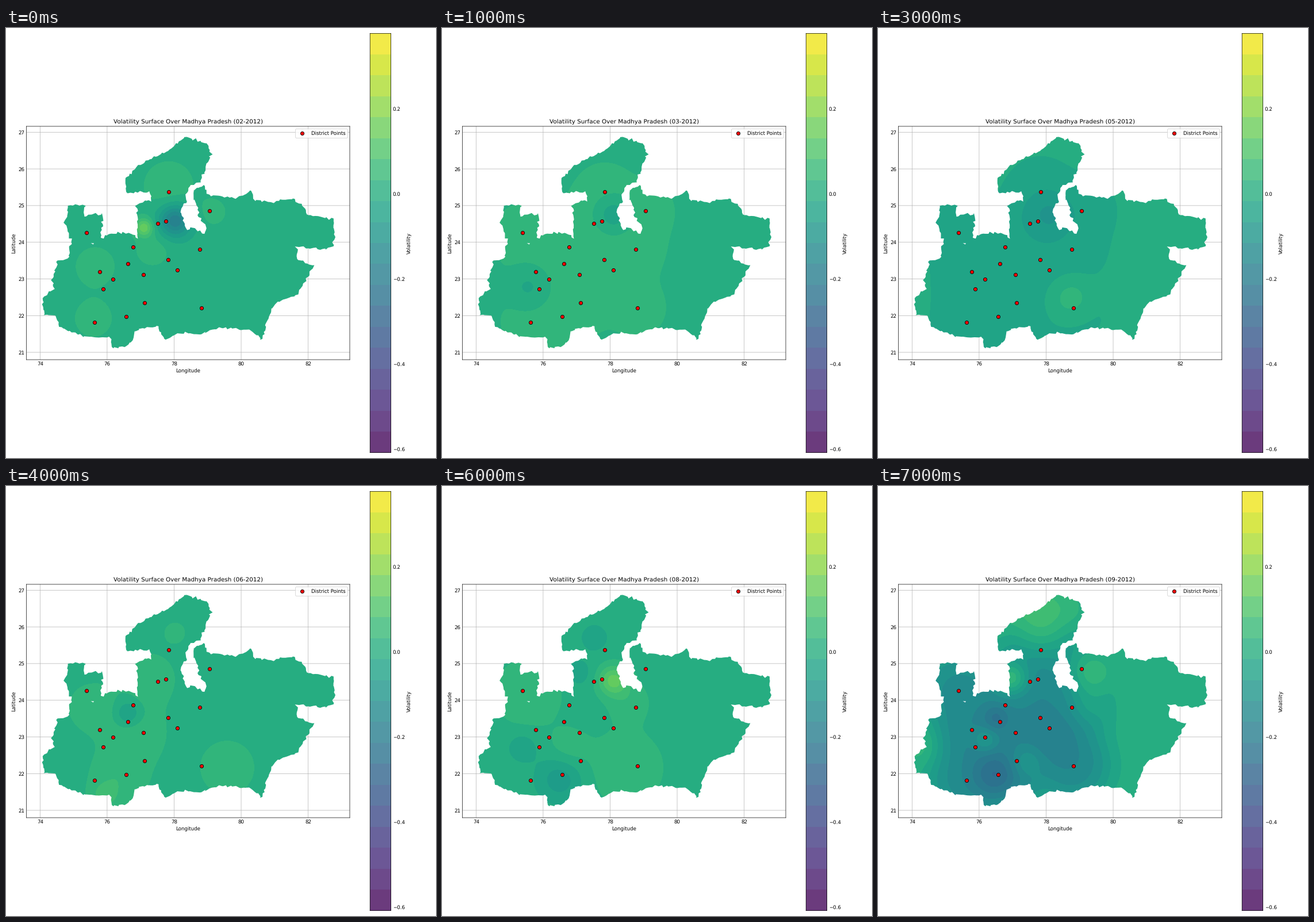
A matplotlib script for the animation above (8 s loop, 748 by 748 pixels).

```python
import numpy as np
import matplotlib.pyplot as plt
from matplotlib.animation import FuncAnimation
from matplotlib.path import Path

SIZE = 748
LEFT, RIGHT, TOP, BOTTOM = 35.55, 598, 171, 577
BAR = (633.2, 669.65, 9.35, 738.65)
CALM, STEP = 0.62, 0.035          # colormap position of zero, and of one band

# Corners of the state border in screen pixels, clockwise from the northern tip
BORDER = [
    (311, 190), (348, 200), (357, 219), (338, 268), (318, 275), (313, 290),
    (314, 302), (304, 317), (309, 338), (315, 352), (324, 347), (346, 357),
    (349, 345), (335, 329), (333, 312), (324, 282), (346, 273), (350, 290),
    (372, 293), (400, 297), (426, 283), (432, 299), (462, 303), (500, 297),
    (519, 312), (524, 325), (570, 332), (571, 376), (556, 385), (506, 381),
    (506, 401), (535, 414), (508, 463), (468, 478), (452, 516), (446, 542),
    (428, 527), (372, 521), (334, 534), (310, 529), (275, 541), (264, 518),
    (228, 525), (212, 553), (186, 557), (182, 539), (135, 537), (92, 520),
    (86, 500), (66, 501), (64, 468), (82, 455), (82, 434), (91, 405),
    (110, 400), (114, 372), (103, 338), (109, 309), (138, 307), (134, 326),
    (168, 324), (165, 370), (148, 376), (185, 357), (214, 357), (229, 366),
    (227, 308), (254, 298), (250, 286), (210, 287), (206, 264), (232, 237),
    (284, 212),
]
STATIONS = [
    (283, 285), (354, 318), (263.5, 340.5), (277.5, 336), (140, 356),
    (221, 381), (337, 385), (281.5, 403), (211.5, 410), (297.5, 420.5),
    (162.5, 424), (238.5, 429), (185.5, 436.5), (169, 454), (240.5, 478.5),
    (339.5, 487), (209, 501.5), (153.5, 511.5),
]

viridis = plt.get_cmap("viridis")
rng = np.random.default_rng(4)


def to_lon(x):
    return 74 + (np.asarray(x) - 59.3) / 58.29


def to_lat(y):
    return 27 - (np.asarray(y) - 181.3) / 63.8


def add_axes(x0, x1, y0, y1):
    return fig.add_axes([x0 / SIZE, 1 - y1 / SIZE, (x1 - x0) / SIZE, (y1 - y0) / SIZE])


def border_path():
    """Border through the corners, roughened by seeded jitter."""
    ring = np.array(BORDER + BORDER[:1], float)
    along = np.r_[0, np.cumsum(np.hypot(*np.diff(ring, axis=0).T))]
    spots = np.arange(0, along[-1], 4)
    x, y = (np.interp(spots, along, ring[:, k]) + rng.normal(0, 1.2, spots.size)
            for k in (0, 1))
    return Path(np.c_[to_lon(x), to_lat(y)])


def bump(x, y, r):
    return np.exp(-((X - x) ** 2 + (Y - y) ** 2) / (2 * r * r))


def surface(level, *blobs):
    """A level held near the stations, plus round blobs (x, y, height, radius)."""
    field = level * near + sum(h * bump(x, y, r) for x, y, h, r in blobs)
    bands = np.arange(-9, 13)
    filled = ax.contourf(to_lon(X), to_lat(Y), field,
                         levels=np.r_[bands - 0.5, bands[-1] + 0.5],
                         colors=viridis(np.clip(CALM + STEP * bands, 0, 1)),
                         zorder=2)
    filled.set_clip_path(border, ax.transData)
    return filled


def draw_colorbar(bands=20):
    bar = add_axes(*BAR)
    edges = np.linspace(-0.609, 0.3765, bands + 1)
    for k in range(bands):
        shade = np.array(viridis((k + 0.5) / bands)[:3])
        bar.axhspan(edges[k], edges[k + 1], color=0.8 * shade + 0.2,
                    lw=0, antialiased=False)
    bar.set(xlim=(0, 1), ylim=(edges[0], edges[-1]), xticks=[],
            yticks=[-0.6, -0.4, -0.2, 0, 0.2])
    bar.yaxis.tick_right()
    bar.yaxis.set_label_position("right")
    bar.set_ylabel("Volatility")
    return bar


plt.rcParams.update({"font.family": "DejaVu Sans", "text.hinting": "no_hinting",
                     "xtick.major.size": 0, "ytick.major.size": 0})
fig = plt.figure(figsize=(12, 12), dpi=SIZE / 12, facecolor="white")
ax = add_axes(LEFT, RIGHT, TOP, BOTTOM)
ax.set(xlim=to_lon([LEFT, RIGHT]), ylim=to_lat([BOTTOM, TOP]),
       xticks=range(74, 83, 2), yticks=range(21, 28),
       xlabel="Longitude", ylabel="Latitude")
ax.grid(True)
bar = draw_colorbar()
for line in [*ax.get_xgridlines(), *ax.get_ygridlines(),
             *ax.spines.values(), *bar.spines.values()]:
    line.set_snap(False)

X, Y = np.meshgrid(np.arange(50, 590, 2.0), np.arange(180, 570, 2.0))
crowd = sum(bump(x, y, 32) for x, y in STATIONS)
near = crowd / (crowd + 0.3)
border = border_path()

february = surface(
    0, (283, 275, 1.1, 34), (294, 335, -5.5, 20), (240, 347, 4, 11),
    (255, 385, 1, 23), (155, 415, 1.2, 25), (152, 505, 1.1, 25), (360, 320, 0.9, 19))
march = surface(1, (298, 325, -2, 20), (150, 450, -1.5, 25))
april = surface(
    5, (299, 328, 6, 24), (237, 325, -5, 24), (110, 455, -3.5, 34),
    (205, 500, 2.5, 28), (270, 460, 1.2, 38), (283, 525, -2.5, 22), (265, 255, -3, 28))
may = surface(-1.5, (335, 470, 2, 30), (298, 325, -1.5, 24))
june = surface(
    0, (250, 335, 1.1, 34), (225, 430, 1.3, 38), (195, 510, 1.3, 36),
    (150, 385, 1.2, 30), (170, 540, 1.4, 16), (212, 396, -2.4, 17),
    (385, 490, 1.2, 35), (294, 255, 1, 14))
july = surface(
    8, (302, 322, 2.8, 26), (303, 458, 4.3, 32), (130, 460, 2.8, 24),
    (193, 455, -2.2, 22), (265, 372, -1.5, 22), (262, 245, -4, 32))
august = surface(
    0, (265, 264, -1.1, 18), (237, 325, -1.2, 17), (298, 338, 3.8, 18),
    (325, 375, 1.1, 26), (150, 360, 1.4, 41), (220, 455, 1, 25),
    (320, 490, 1.4, 45), (205, 510, -2.2, 27), (140, 455, -1.5, 17))
september = surface(
    -5, (283, 245, 4.6, 38), (372, 322, 4.8, 30), (232, 335, 5, 20),
    (85, 450, 1.5, 25), (203, 503, -3.2, 28), (205, 403, -2.2, 16),
    (187, 442, 2.2, 14), (315, 450, -1.2, 40), (258, 480, 2, 18), (365, 385, 2, 25))
months = [february, march, april, may, june, july, august, september]

points = np.array(STATIONS)
ax.scatter(to_lon(points[:, 0]), to_lat(points[:, 1]), s=50, c="red",
           edgecolors="black", label="District Points", zorder=3)
ax.legend(loc="upper right")
title = ax.set_title("")


def show_month(i):
    for k, filled in enumerate(months):
        filled.set_visible(k == i)
    title.set_text(f"Volatility Surface Over Madhya Pradesh ({i + 2:02d}-2012)")
    return [*months, title]


anim = FuncAnimation(fig, show_month, frames=len(months), interval=1000,
                     repeat=True, repeat_delay=0)
plt.show()
```
